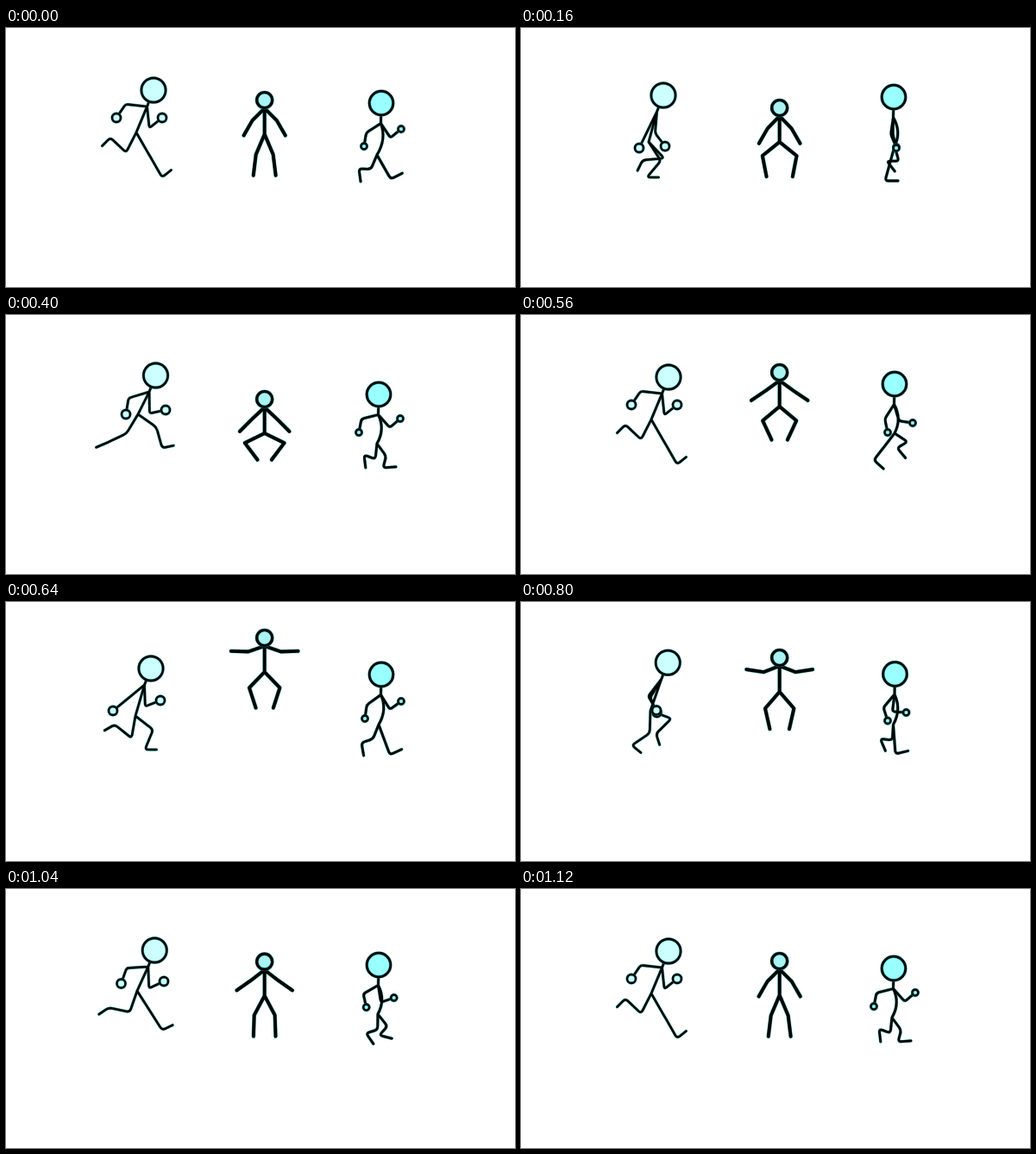
An HTML page with a canvas that plays this animation: 590x300 px, repeating every 1200 ms.

```html
<!DOCTYPE html>
<html lang="en">
<head>
<meta charset="utf-8">
<title>Run, jump, walk</title>
<style>
html, body { margin: 0; width: 100%; height: 100%; overflow: hidden; background: #fff; }
canvas { display: block; }
</style>
</head>
<body>
<canvas id="stage" width="590" height="300"></canvas>
<script>
const ctx = document.getElementById('stage').getContext('2d');
const STEP = 80, STEPS = 15;
const RAD = Math.PI / 180;

// Key poses of a stride: hands and ankles only, elbows and knees are solved.
// A foot is ankle x, y and the angle of the toes.
const stride = (at, head, hip, hands, feet, cross) =>
  ({ at, cross, data: { head, hip, hands, feet } });

const runner = {
  period: 7, width: 2.6, headR: 14.1, handR: 5, fill: '#ccffff',
  neck: [-7.5, 19], bulge: 0, arm: [25, 19], leg: [26, 25], foot: 13.5, soft: 4,
  keys: [
    stride(0, [171, 72], [151, 121], [[128, 104], [181, 104]], [[121, 127, 135], [181, 173, -39]]),
    stride(1, [168, 77], [150, 132], [[124, 126], [179, 114]], [[126, 142, 150], [161, 171, 0]]),
    stride(2, [165, 78], [148, 132], [[137, 139], [167, 137]], [[141, 153, 116], [146, 173, 0]], true),
    stride(4, [175.5, 62.5], [152, 120], [[147, 114], [178, 117]], [[111, 159, 78], [172, 152, 28]]),
    stride(5, [173.5, 70], [153, 115], [[139, 115], [185, 110]], [[117, 148, 157], [181, 154, -12]])
  ]
};

const walker = {
  period: 9, width: 2.8, headR: 13.8, handR: 3.5, fill: '#99ffff',
  neck: [-0.5, 23.5], bulge: 9, arm: [20, 16], leg: [18, 14], foot: 15, soft: 4,
  keys: [
    stride(0, [435, 87], [430, 147], [[415, 137], [458, 117]], [[409, 163, 82], [446, 175, -27]]),
    stride(2, [432, 80], [433, 137], [[435, 138], [435, 139]], [[424, 154, 52], [422, 177, 0]], true),
    stride(5, [432, 92], [430, 149], [[409, 136], [457, 120]], [[415, 162, 83], [437, 177, -4]], true),
    stride(7, [433, 80], [433, 137], [[425, 136], [454, 125]], [[409, 168, 42], [436, 154, 50]]),
    stride(8, [435, 84], [432, 142], [[416, 135], [458, 115]], [[412, 163, 80], [445, 177, -25]])
  ]
};

// The jumper is symmetric: shoulder height, then arm and leg bone angles from straight down.
const leap = (at, y, arm, leg) => ({ at, data: { y, arm, leg } });

const jumper = {
  period: 14, width: 3.8, headR: 9, fill: '#aaf3f3',
  x: 299.7, torso: 30, arm: [20, 20], leg: [25.5, 24.5],
  keys: [
    leap(0, 93, [45, 30], [23, 7]),
    leap(2, 102, [44, 30], [51, -11]),
    leap(5, 107, [47, 45], [64, -37]),
    leap(7, 76, [54, 56], [50, -25]),
    leap(8, 51, [71, 92], [44, -18]),
    leap(11, 95, [67, 105], [38, -8])
  ],
  // falling from the top of the jump gathers speed
  ease: (k, from) => from === 8 ? k ** 1.6 : k
};

function mix(a, b, k) {
  if (typeof a === 'number') return a + (b - a) * k;
  if (Array.isArray(a)) return a.map((v, i) => mix(v, b[i], k));
  return Object.fromEntries(Object.keys(a).map(n => [n, mix(a[n], b[n], k)]));
}

const crossed = d => ({ ...d, hands: [...d.hands].reverse(), feet: [...d.feet].reverse() });

function poseAt({ keys, period, ease = k => k }, step) {
  const t = step % period;
  const n = keys.findLastIndex(key => key.at <= t);
  const a = keys[n], b = keys[(n + 1) % keys.length];
  const span = (b.at - a.at + period) % period;
  if (t === a.at) return a.data;
  const end = a.cross ? crossed(b.data) : b.data;
  return mix(a.data, end, ease((t - a.at) / span, a.at));
}

// Two-bone joint between p and q; side picks the way it bends.
function joint(p, q, [upper, lower], side) {
  const dx = q[0] - p[0], dy = q[1] - p[1];
  const d = Math.hypot(dx, dy);
  const straight = d >= upper + lower;
  const along = straight ? d * upper / (upper + lower) : (d * d + upper ** 2 - lower ** 2) / (2 * d);
  const out = straight ? 0 : side * Math.sqrt(Math.max(0, upper ** 2 - along ** 2));
  return [p[0] + (dx * along - dy * out) / d, p[1] + (dy * along + dx * out) / d];
}

function toward(p, q, dist) {
  const len = Math.hypot(q[0] - p[0], q[1] - p[1]) || 1;
  return mix(p, q, Math.min(dist / len, 0.5));
}

// Polyline with softened corners.
function limb(path, pts, soft) {
  path.moveTo(...pts[0]);
  for (let i = 1; i < pts.length - 1; i++) {
    path.lineTo(...toward(pts[i], pts[i - 1], soft));
    path.quadraticCurveTo(...pts[i], ...toward(pts[i], pts[i + 1], soft));
  }
  path.lineTo(...pts[pts.length - 1]);
}

// Black line with a thin teal rim.
function ink(path, width) {
  for (const [color, extra] of [['rgba(0,150,150,0.7)', 0.9], ['#000', 0]]) {
    ctx.strokeStyle = color;
    ctx.lineWidth = width + extra;
    ctx.stroke(path);
  }
}

function ball(p, r, fill, width) {
  const path = new Path2D();
  path.arc(p[0], p[1], r, 0, Math.PI * 2);
  ctx.fillStyle = fill;
  ctx.fill(path);
  ink(path, width);
}

function drawStrider(fig, step) {
  const { head, hip, hands, feet } = poseAt(fig, step);
  const neck = [head[0] + fig.neck[0], head[1] + fig.neck[1]];
  const mid = mix(neck, hip, 0.5);
  const path = new Path2D();
  path.moveTo(...head);
  path.lineTo(...neck);
  path.quadraticCurveTo(mid[0] + fig.bulge, mid[1], ...hip);
  for (const hand of hands) limb(path, [neck, joint(neck, hand, fig.arm, 1), hand], 3);
  for (const [x, y, turn] of feet) {
    const ankle = [x, y];
    const toe = [x + fig.foot * Math.cos(turn * RAD), y + fig.foot * Math.sin(turn * RAD)];
    limb(path, [hip, joint(hip, ankle, fig.leg, -1), ankle, toe], fig.soft);
  }
  ink(path, fig.width);
  ball(head, fig.headR, fig.fill, fig.width);
  for (const hand of hands) ball(hand, fig.handR, fig.fill, 2.4);
}

function drawJumper(fig, step) {
  const { y, arm, leg } = poseAt(fig, step);
  const path = new Path2D();
  const chain = (top, bones, angles, side) => {
    const pts = [[fig.x, top]];
    bones.forEach((len, i) => {
      const [px, py] = pts[i], a = angles[i] * RAD;
      pts.push([px + side * len * Math.sin(a), py + len * Math.cos(a)]);
    });
    limb(path, pts, 0);
  };
  limb(path, [[fig.x, y - fig.headR], [fig.x, y + fig.torso]], 0);
  for (const side of [-1, 1]) {
    chain(y, fig.arm, arm, side);
    chain(y + fig.torso, fig.leg, leg, side);
  }
  ink(path, fig.width);
  ball([fig.x, y - fig.headR - 0.5], fig.headR, fig.fill, 3.2);
}

function draw(now) {
  const step = Math.floor(now / STEP) % STEPS;
  ctx.fillStyle = '#fff';
  ctx.fillRect(0, 0, 590, 300);
  ctx.lineCap = ctx.lineJoin = 'round';
  drawStrider(runner, step);
  drawJumper(jumper, step);
  drawStrider(walker, step);
}

function tick(now) {
  draw(now);
  requestAnimationFrame(tick);
}
draw(0);
requestAnimationFrame(tick);
</script>
</body>
</html>
```
